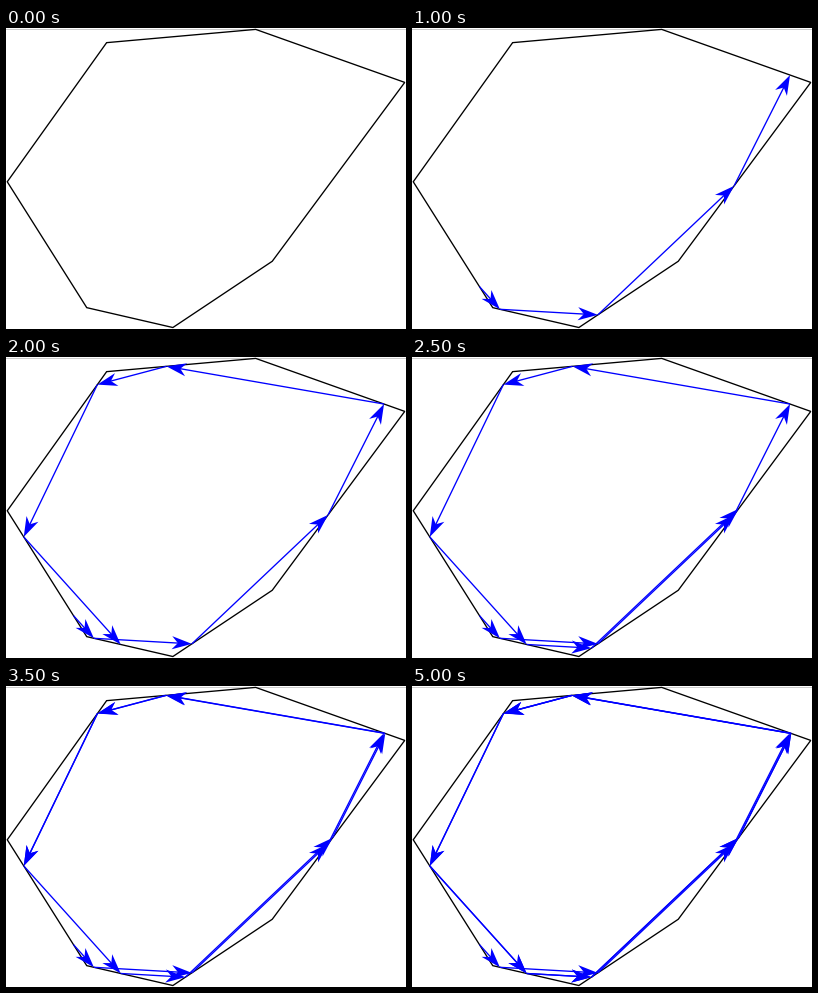
Recreate the animation shown at these times as a matplotlib script. Size 400 by 301 pixels, loop 5.25 s.

```python
import numpy as np
import matplotlib.pyplot as plt
from matplotlib.animation import FuncAnimation
from matplotlib.patches import Polygon

W, H, DPI = 400, 301, 64
SCALE, ORIGIN = 6.625, np.array([1.25, 1.4])
ANGLE = 0.17            # every bounce leaves its wall at this angle
BOUNCES = 20
LINE = 1.33 * 72 / DPI

# table corners, in travelling order
CORNERS = np.array([(0, 23), (12, 42), (25, 45), (40, 35),
                    (60, 8), (37.5, 0), (15, 2)]) * SCALE + ORIGIN


def cross(a, b):
    return a[0] * b[1] - a[1] * b[0]


def wall(k):
    n = len(CORNERS)
    return CORNERS[k % n], CORNERS[(k + 1) % n]


def bounce(p, k):
    """Leave wall k at the fixed angle; return the hit point and its wall."""
    a, b = wall(k)
    c, s = np.cos(ANGLE), np.sin(ANGLE)
    d = np.array([[c, s], [-s, c]]) @ (b - a)
    for j in range(k + 1, k + len(CORNERS)):
        a, b = wall(j)
        e = b - a
        t = cross(a - p, e) / cross(d, e)
        u = cross(a - p, d) / cross(d, e)
        if t > 0 and 0 <= u <= 1:
            return p + t * d, j % len(CORNERS)


def trajectory():
    a, b = wall(0)
    p, k = a + (b - a) * 5 / 6, 0
    points = [p]
    for _ in range(BOUNCES):
        p, k = bounce(p, k)
        points.append(p)
    return points


def add_arrow(ax, p, q, z):
    d = (q - p) / np.hypot(*(q - p))
    n = np.array([-d[1], d[0]])
    end = q - 10 * d
    shaft, = ax.plot([p[0], end[0]], [p[1], end[1]], color="blue", lw=LINE,
                     solid_capstyle="butt", zorder=z)
    head = Polygon([q, q - 20 * d + 6.6 * n, q - 14 * d, q - 20 * d - 6.6 * n],
                   fc="blue", ec="none", zorder=z)
    ax.add_patch(head)
    return shaft, head


fig = plt.figure(figsize=(W / DPI, H / DPI), dpi=DPI, facecolor="white")
ax = fig.add_axes([0, 0, 1, 1])
ax.set(xlim=(0, W), ylim=(H, 0))
ax.axis("off")

for y in (0.5, H - 0.5):
    ax.axhline(y, color="#cccccc", lw=72 / DPI, zorder=1)
ax.add_patch(Polygon(CORNERS, fill=False, ec="black", lw=LINE, zorder=2))

path = trajectory()
arrows = [add_arrow(ax, p, q, 3 + i)
          for i, (p, q) in enumerate(zip(path, path[1:]))]


def draw(frame):
    for i, parts in enumerate(arrows):
        for part in parts:
            part.set_visible(i < frame)
    return [part for parts in arrows for part in parts]


anim = FuncAnimation(fig, draw, frames=BOUNCES + 1, interval=250,
                     repeat=True, repeat_delay=0, blit=False)
plt.show()
```
